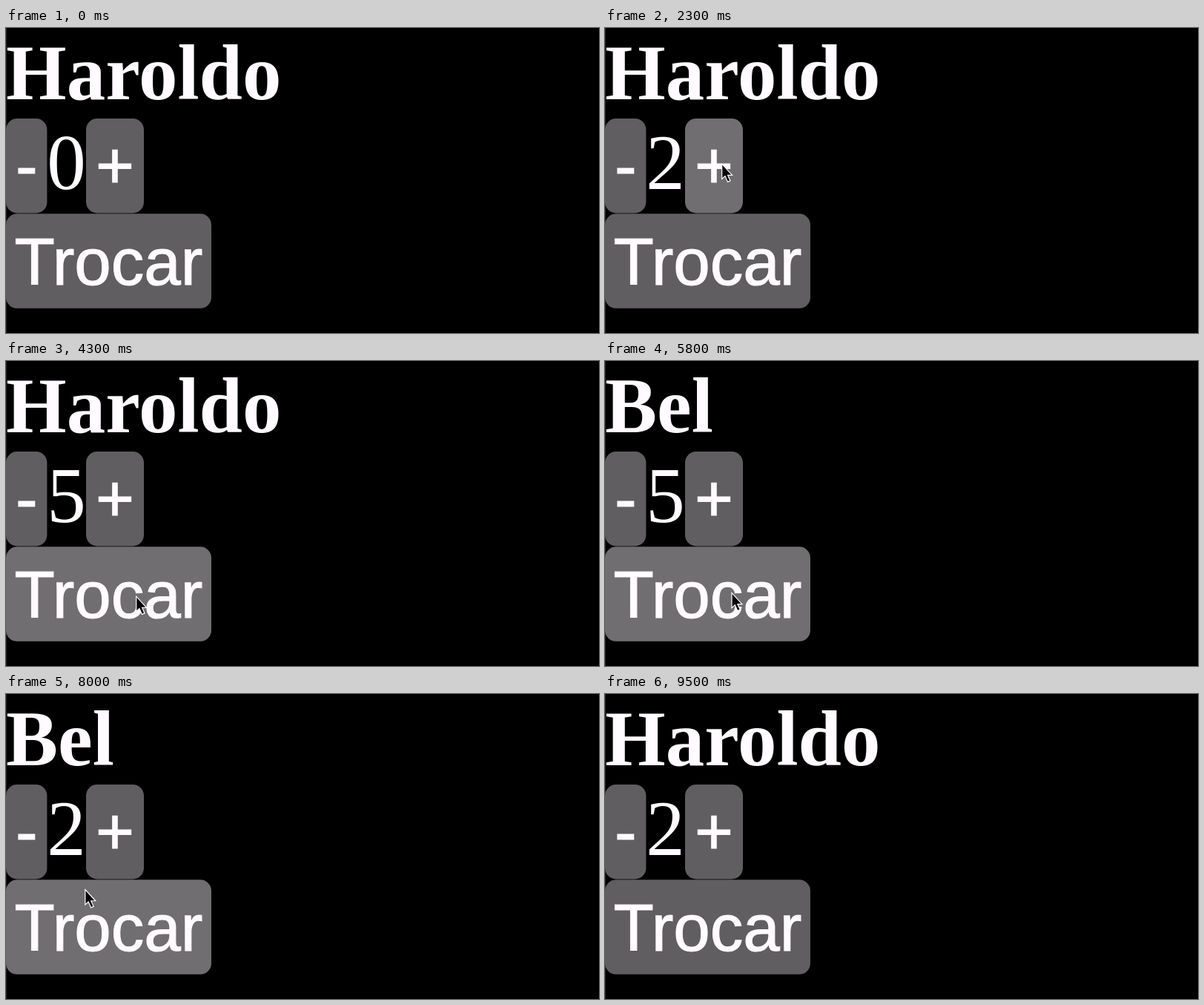
Animation of 800x411 px, one loop 10000 ms. Source, as an HTML page:

```html
<!DOCTYPE html>
<html lang="pt">
<head>
<meta charset="utf-8">
<style>
  html, body { margin: 0; width: 100%; height: 100%; overflow: hidden; background: #000; }
  svg { display: block; }
  text { fill: #fffbff; }
  .serif { font: 105px "Liberation Serif", Times, serif; }
  .name { font-weight: bold; }
  .label {
    font: 89px "Liberation Sans", Arial, sans-serif;
    text-anchor: middle;
    stroke: #fffbff;
    stroke-width: 1.2px;
  }
</style>
</head>
<body>
<svg width="800" height="411" viewBox="0 0 800 411">
  <rect width="1" height="411" fill="#222"/>
  <text id="name" class="serif name" x="0" y="96"></text>
  <text id="count" class="serif" x="55.3" y="217"></text>
  <g id="buttons"></g>
  <path id="cursor" d="M.7 1.2V21.5L5 17.6L8.5 25.4L12 23.9L8.6 16.3H14.6Z"
    fill="#000" stroke="#fff" stroke-width="1.2"/>
</svg>
<script>
const LOOP = 10000, FRAME = 100, HOLD = 90;
const COLORS = { idle: '#605e60', hover: '#706e70', active: '#575557' };
const NAMES = ['Haroldo', 'Bel'];
const $ = id => document.getElementById(id);

function svg(tag, attrs, text = '') {
  const el = document.createElementNS('http://www.w3.org/2000/svg', tag);
  for (const key in attrs) el.setAttribute(key, attrs[key]);
  el.textContent = text;
  $('buttons').append(el);
  return el;
}

function button(label, x, y, width, baseline, action) {
  const height = 127.5;
  const rect = svg('rect', { x, y, width, height, rx: 15 });
  svg('text', { x: x + width / 2, y: baseline, class: 'label' }, label);
  const contains = p => p.x >= x && p.x < x + width && p.y >= y && p.y < y + height;
  return { rect, contains, action };
}

const buttons = [
  button('-', 0, 122, 55.4, 215.5, s => s.count--),
  button('+', 108, 122, 78, 215.5, s => s.count++),
  button('Trocar', 0, 250.3, 277, 345.5, s => s.name = 1 - s.name),
];

// Pointer visits, each ending at x, y; clicks hit whatever lies below
const enter = { x: 268, y: 340, time: 600 }, leave = 9500;
const moves = [
  { from: 500, to: 1500, x: 157, y: 182 },
  { from: 3800, to: 4300, x: 175, y: 316 },
  { from: 5700, to: 6600, x: 38, y: 178 },
  { from: 7800, to: 8100, x: 130, y: 292 },
  { from: 9300, to: 9500, x: 506, y: 332 },
];
const clicks = [1900, 2200, 2600, 2900, 3500, 5100, 7000, 7400, 7605, 8900];

function pointer(t) {
  let { x, y } = enter;
  for (const m of moves) {
    const k = Math.min(1, Math.max(0, (t - m.from) / (m.to - m.from)));
    const e = k * k * (3 - 2 * k);
    x += (m.x - x) * e;
    y += (m.y - y) * e;
  }
  return { x, y };
}

const buttonAt = t => buttons.find(b => b.contains(pointer(t)));

function draw(now) {
  const t = Math.floor(now % LOOP / FRAME) * FRAME;
  const state = { count: 0, name: 0 };
  for (const c of clicks)
    if (c + HOLD <= t) buttonAt(c).action(state);

  const visible = t >= enter.time && t < leave;
  const target = visible && buttonAt(t);
  const pressed = clicks.some(c => t >= c && t < c + HOLD);
  for (const b of buttons) {
    const look = b !== target ? 'idle' : pressed ? 'active' : 'hover';
    b.rect.setAttribute('fill', COLORS[look]);
  }

  const { x, y } = pointer(t);
  $('name').textContent = NAMES[state.name];
  $('count').textContent = state.count;
  $('cursor').setAttribute('visibility', visible ? 'visible' : 'hidden');
  $('cursor').setAttribute('transform', `translate(${x} ${y})`);
}

const start = performance.now();
function tick() {
  draw(performance.now() - start);
  requestAnimationFrame(tick);
}
tick();
</script>
</body>
</html>
```
